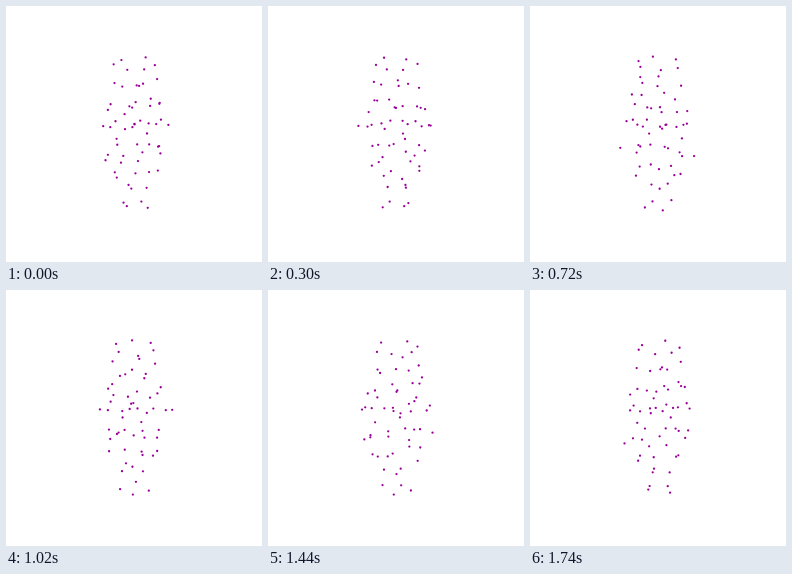
An HTML page with a canvas that plays this animation: 256x256 px, repeating every 1800 ms.

```html
<!DOCTYPE html>
<html>
<head>
<meta charset="utf-8">
<style>
html, body { margin: 0; width: 100%; height: 100%; overflow: hidden; background: #fff; }
canvas { display: block; }
</style>
</head>
<body>
<canvas id="stage" width="256" height="256"></canvas>
<script>
const ctx = document.getElementById('stage').getContext('2d');
const LOOP = 1800, STEP = 60, DEPTH = 216, CENTER = 128.5;

// Radius from the vertical axis -> pairs of height and starting angle in degrees
const shells = [
  [2.5, [-48.8, 30, -27, 198]],
  [9, [52, 227]],
  [12.5, [-14.5, 299, -10, 90, -5.5, 218, -1, 3, 51, 104, 52.4, 18]],
  [14.5, [71, 218, 71, 300, 71, 28, 67.5, 120]],
  [20, [10.5, 321, 38.2, 186]],
  [21, [-70.5, 183, -70.5, 248, -70.5, 300, -70.5, 350, -70.5, 61, -68.5, 125]],
  [22.5, [-52, 234, -53.5, 283, -48.5, 147, -55, 4, -45.8, 70, 40.4, 314, 40, 137]],
  [24.5, [-36, 273, 4, 132, 34.4, 88, 29.5, 279, 30.7, 233, 11, 221, 11, 277]],
  [26.5, [-39, 312, -31.5, 200, -30, 26, -31.7, 345, 20.2, 178, 19.2, 353, 33.5, 35, 11.3, 34, 19, 112]],
  [28.5, [-22.8, 247, -23, 151, -25.3, 61, -24.5, 99, 15.5, 76, -15.4, 344]],
  [33, [-12.5, 299, -11.5, 120, -8.6, 192]],
  [34.5, [-8.5, 266, -8.5, 90, -9, 57, -9, 23]],
  [37.7, [-8.2, 224, 13, 317, 22.4, 132]]
];

function dot(radius, height, angle) {
  const scale = DEPTH / (DEPTH - radius * Math.sin(angle));
  ctx.beginPath();
  ctx.arc(CENTER + radius * Math.cos(angle) * scale, CENTER + height * scale, 1.15, 0, 2 * Math.PI);
  ctx.fill();
}

function draw(time) {
  const turn = Math.floor(time % LOOP / STEP) * STEP / LOOP * 360;
  ctx.fillStyle = '#fff';
  ctx.fillRect(0, 0, 256, 256);
  ctx.fillStyle = '#909';
  for (const [radius, spots] of shells)
    for (let i = 0; i < spots.length; i += 2)
      dot(radius, spots[i], (spots[i + 1] - turn) * Math.PI / 180);
}

const start = performance.now();
function tick() {
  draw(performance.now() - start);
  requestAnimationFrame(tick);
}
tick();
</script>
</body>
</html>
```
